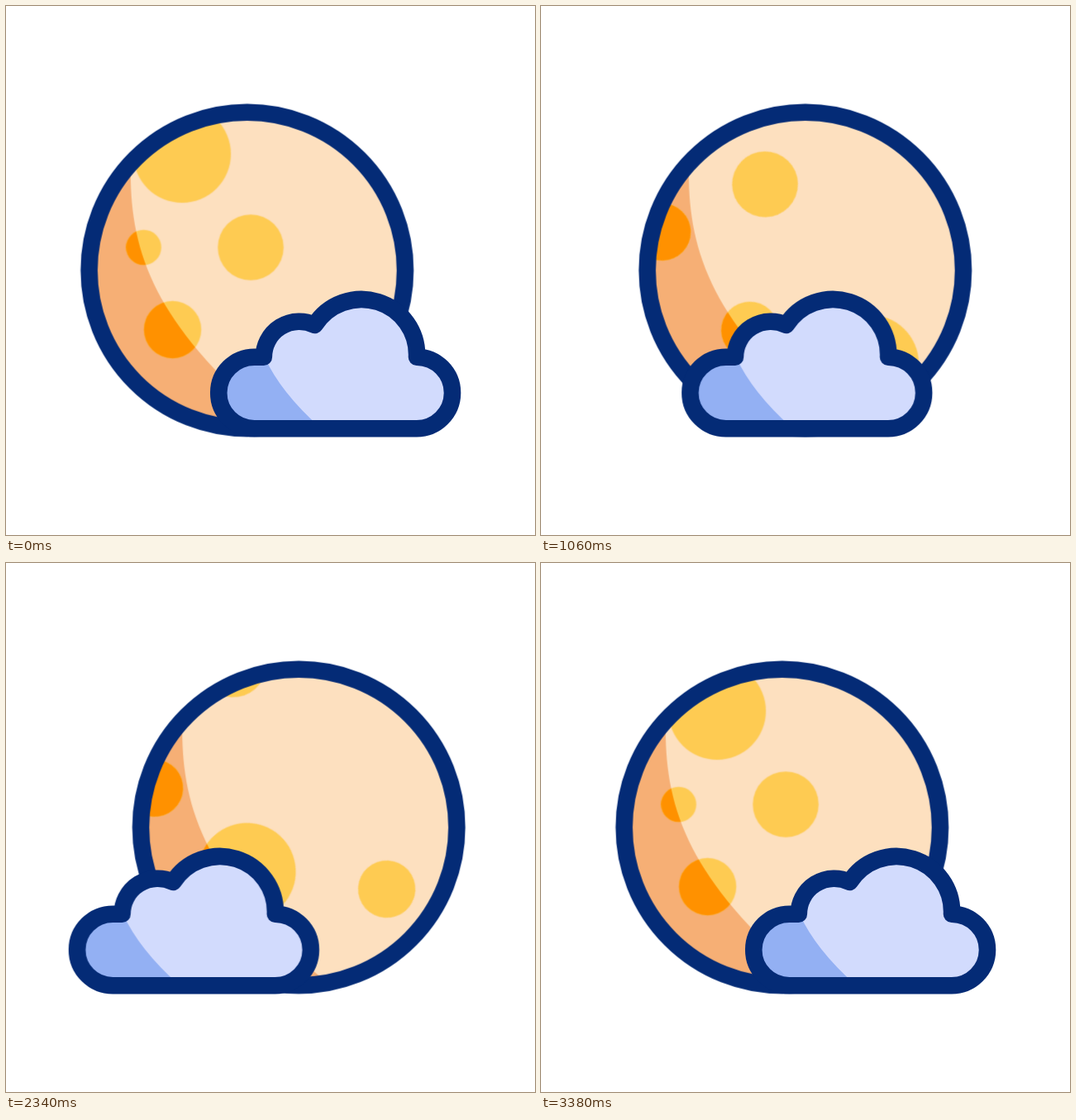
Recreate the animation shown at these times as an HTML page. Size 640 by 640 pixels, loop 3600 ms.

```html
<!DOCTYPE html>
<html lang="en">
<head>
<meta charset="utf-8">
<title>Moon and cloud</title>
<style>
  html, body { margin: 0; width: 100%; height: 100%; overflow: hidden; background: #fff; }
  svg { display: block; width: 100%; height: 100%; }
  .line { fill: none; stroke: #042b76; stroke-width: 20.6; stroke-linejoin: round; }
</style>
</head>
<body>
<svg viewBox="0 0 640 640">
  <defs>
    <clipPath id="disc"><circle r="190"/></clipPath>
    <path id="shade" d="M-141 -200V-118C-141 -20 -110 65 25 180L70 220H-220V-200Z"/>
    <clipPath id="dark"><use href="#shade"/></clipPath>
    <path id="puff" d="M300.5 511.2A43.25 43.25 0 0 1 300.5 424.7H311.8A43 43 0 0 1 373.5 386A67 67 0 0 1 497 424.7A43.25 43.25 0 0 1 496.5 511.2Z"/>
    <clipPath id="puffClip"><use href="#puff"/></clipPath>
  </defs>

  <g id="moon">
    <g clip-path="url(#disc)">
      <circle r="190" fill="#fde0bf"/>
      <use href="#shade" fill="#f6af75"/>
      <g class="craters" fill="#fecb52"></g>
      <g clip-path="url(#dark)"><g class="craters" fill="#ff9100"></g></g>
    </g>
    <circle class="line" r="191.2"/>
  </g>

  <g id="cloud">
    <use href="#puff" fill="#d2dbfd"/>
    <path clip-path="url(#puffClip)" fill="#93b0f3" d="M240 400H302L313 425Q332 467 380 510V520H240Z"/>
    <use href="#puff" class="line"/>
  </g>
</svg>
<script>
  const LOOP = 3600;
  const OUT = 240, TURN = 1920, HOME = 3380;

  // x, y, radius around the point the surface turns on
  const CRATERS = [
    [-251, -45, 59], [-168, 68, 39.8], [-297.5, 68, 21.3], [-262.5, 167.5, 34.7],
    [30, 223, 59], [158.4, 111, 34.7], [-120, 239, 34.7]
  ];

  const move = (x, y, deg = 0) => `translate(${x}px, ${y}px) rotate(${deg}deg)`;

  // Rest, swing across, swing back, rest
  function swing(el, from, to) {
    el.animate([
      { offset: 0, transform: from },
      { offset: OUT / LOOP, transform: from, easing: 'cubic-bezier(.845, 0, .16, 1)' },
      { offset: TURN / LOOP, transform: to, easing: 'cubic-bezier(.84, 0, .11, 1)' },
      { offset: HOME / LOOP, transform: from },
      { offset: 1, transform: from }
    ], { duration: LOOP, iterations: Infinity });
  }

  const discs = CRATERS.map(([x, y, r]) => `<circle cx="${x}" cy="${y}" r="${r}"/>`).join('');

  for (const g of document.querySelectorAll('.craters')) {
    g.innerHTML = discs;
    swing(g, move(172.3, -95.8), move(77.5, -118.8, 51.5));
  }
  swing(document.getElementById('moon'), move(291.7, 319.8), move(358.5, 319.8));
  swing(document.getElementById('cloud'), move(0, 0), move(-183, 0));
</script>
</body>
</html>
```
